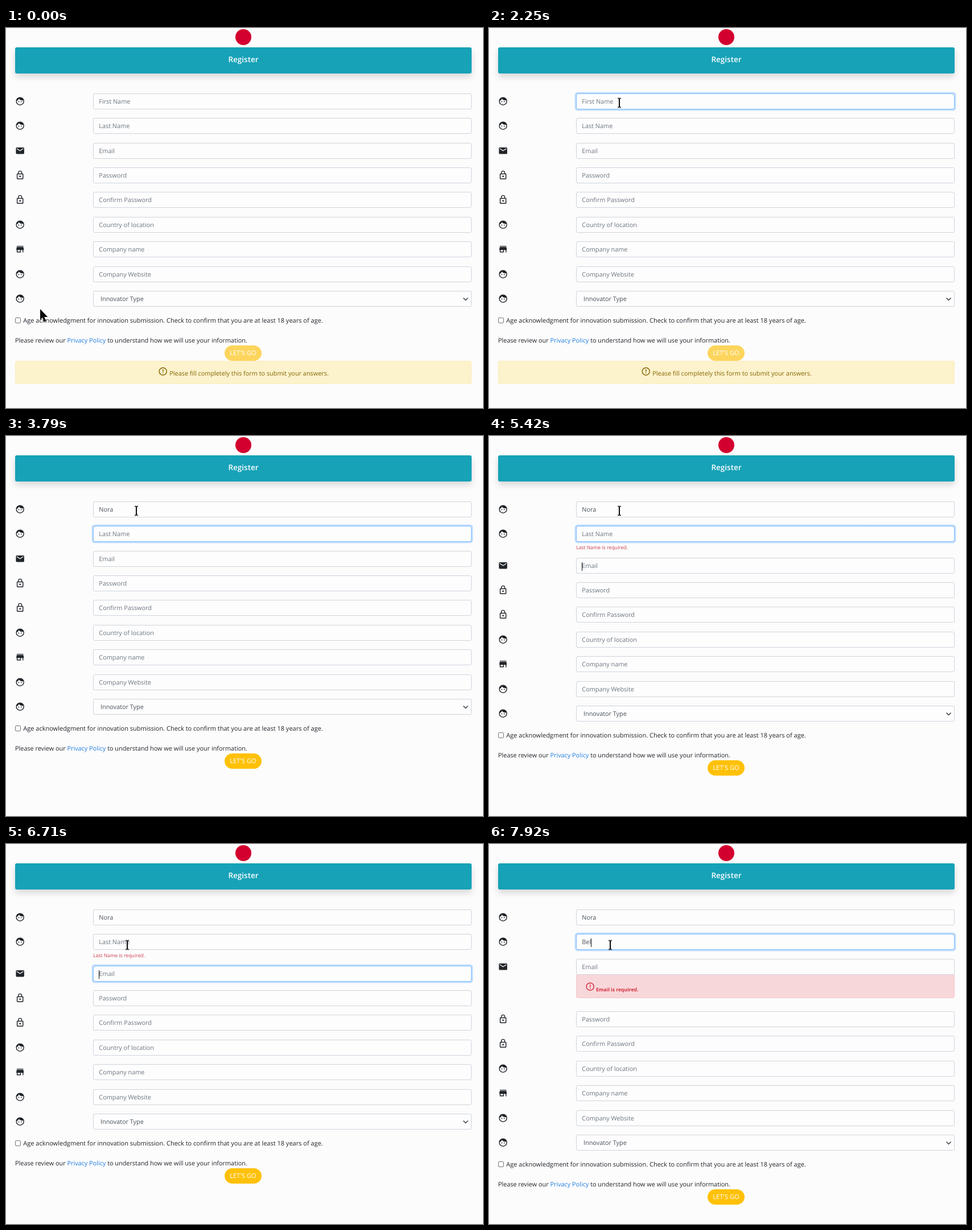
Recreate the animation shown at these times as an HTML page. Size 838 by 668 pixels, loop 8 s.

```html
<!DOCTYPE html>
<html lang="en">
<head>
<meta charset="utf-8">
<title>Register</title>
<style>
html, body { margin: 0; width: 100%; height: 100%; overflow: hidden; }
body {
  position: relative; background: #fcfcfd; color: #212529;
  font: 10.87px/26px "Open Sans", "Noto Sans", sans-serif;
  text-rendering: geometricPrecision; white-space: nowrap;
}
#stage { position: absolute; inset: 0 auto auto 0; width: 838px; height: 668px; overflow: hidden; }
#stage div, #stage p { position: absolute; margin: 0; box-sizing: border-box; }
#stage svg { position: absolute; left: 0; top: 0; fill: currentColor; overflow: visible; }
#stage .icon { width: 17.4px; height: 17.4px; }

#logo { left: 403px; top: 2px; width: 28px; height: 28px; border-radius: 50%; background: #d3002f; }
#title {
  left: 16px; top: 34px; width: 802px; height: 46px; border-radius: 3px;
  background: #17a2b8; box-shadow: 0 6px 12px rgba(0, 0, 0, .15);
  color: #fff; font-size: 13.5px; font-weight: 600; line-height: 42px; text-align: center;
}

/* form rows */
.row { left: 16px; width: 802px; height: 28px; }
#stage .row > .icon { top: 5px; }
.field {
  left: 137px; top: 0; width: 665px; height: 28px; padding-left: 9.3px;
  border: 1px solid #ced4da; border-radius: 3px; background: #fdfdfe;
  color: #495057; line-height: 28px;
}
.field::after {
  content: ""; position: absolute; inset: -1px; opacity: 0; border-radius: 3px;
  border: 1px solid #80bdff; box-shadow: 0 0 0 2.3px rgba(0, 123, 255, .25);
}
.hint { color: #6c757d; }
.field .hint:not(:only-child) { position: absolute; left: 9.3px; }
.select { padding-left: 12px; }
.caret {
  display: inline-block; width: 1px; height: 15px; margin-right: -1px;
  vertical-align: middle; background: #111; opacity: 0;
}
#stage .chevron { left: 649px; top: 11px; width: 9px; height: 5px; }
.typed span { font-size: 0; }

/* messages and footer */
#required { left: 153px; top: 183px; color: #cc3a48; font-size: 8.7px; opacity: 0; }
#danger {
  left: 153px; top: 229px; width: 665px; height: 42px; opacity: 0;
  border: 1px solid #f5c6cb; border-radius: 3px; background: #f8d7da;
  color: #d32f3f; font-size: 8.65px; font-weight: 700;
}
#stage #danger .icon { left: 14.5px; top: 11.5px; }
#danger p { left: 34px; top: 12.5px; }
#check { left: 16px; top: 509px; width: 10px; height: 10px; border: 1px solid #767676; border-radius: 2px; background: #fff; }
#age { left: 30.3px; top: 502px; font-size: 11px; }
#policy { left: 16px; top: 537px; }
#policy span { color: #1f7de0; }
#go {
  left: 384px; top: 558px; width: 65px; height: 27px; border-radius: 14px;
  background: #ffc107; color: #fff; font-size: 11.2px; line-height: 27px; text-align: center; opacity: .65;
}
#warning {
  left: 16px; top: 585px; width: 802px; height: 41px;
  border: 1px solid #fcedc0; border-radius: 3px; background: #fcf2cb; color: #856404;
}
#stage #warning .icon { left: 250px; top: 8.5px; }
#warning p { left: 270.3px; top: 9px; }

/* timeline: 1% is 80 ms */
#lower { inset: 0; animation: lower 8s step-end infinite; }
#tail { inset: 0; animation: tail 8s step-end infinite; }
@keyframes lower { 0% { transform: none } 67.75% { transform: translateY(12px) } 89.625%, to { transform: none } }
@keyframes tail { 0% { transform: none } 85.375%, to { transform: translateY(49px) } }

#first::after { animation: focus-first 8s ease-in-out infinite; }
#last::after { animation: focus-last 8s ease-in-out infinite; }
#email::after { animation: focus-email 8s ease-in-out infinite; }
@keyframes focus-first { 0%, 21.375%, 43%, to { opacity: 0 } 23.25%, 41.125% { opacity: 1 } }
@keyframes focus-last { 0%, 41.125%, 69.7%, 85.375% { opacity: 0 } 43%, 67.75%, 87.25%, to { opacity: 1 } }
@keyframes focus-email { 0%, 67.75%, 87.25%, to { opacity: 0 } 69.7%, 85.375% { opacity: 1 } }

#first .caret { animation: caret-first 8s step-end infinite; }
#last .caret { animation: caret-last 8s step-end infinite; }
#email .caret { animation: caret-email 8s step-end infinite; }
@keyframes caret-first { 0%, 28.125%, 41.125%, to { opacity: 0 } 21.375%, 31.25% { opacity: 1 } }
@keyframes caret-last { 0%, 47.375%, 61%, to { opacity: 0 } 41.125%, 54.125%, 85.375% { opacity: 1 } }
@keyframes caret-email { 0%, 74.5%, 85.375%, to { opacity: 0 } 67.75%, 81.25% { opacity: 1 } }

#first .hint, #warning { animation: gone-first 8s step-end infinite; }
#last .hint { animation: gone-last 8s step-end infinite; }
#go { animation: enable 8s step-end infinite; }
#required { animation: required 8s step-end infinite; }
#danger { animation: danger 8s step-end infinite; }
@keyframes gone-first { 0% { opacity: 1 } 31.25%, to { opacity: 0 } }
@keyframes gone-last { 0% { opacity: 1 } 89.625%, to { opacity: 0 } }
@keyframes enable { 0% { opacity: .65 } 31.25%, to { opacity: 1 } }
@keyframes required { 0%, 89.625%, to { opacity: 0 } 67.75% { opacity: 1 } }
@keyframes danger { 0% { opacity: 0 } 85.375%, to { opacity: 1 } }

.typed span { animation: 8s step-end infinite; }
#first .typed :nth-child(1) { animation-name: key1; }
#first .typed :nth-child(2) { animation-name: key2; }
#first .typed :nth-child(3) { animation-name: key3; }
#first .typed :nth-child(4) { animation-name: key4; }
#last .typed :nth-child(1) { animation-name: key5; }
#last .typed :nth-child(2) { animation-name: key6; }
#last .typed :nth-child(3) { animation-name: key7; }
@keyframes key1 { 0% { font-size: 0 } 31.25%, to { font-size: 10.87px } }
@keyframes key2 { 0% { font-size: 0 } 34.875%, to { font-size: 10.87px } }
@keyframes key3 { 0% { font-size: 0 } 36.5%, to { font-size: 10.87px } }
@keyframes key4 { 0% { font-size: 0 } 38.5%, to { font-size: 10.87px } }
@keyframes key5 { 0% { font-size: 0 } 89.625%, to { font-size: 10.87px } }
@keyframes key6 { 0% { font-size: 0 } 93.75%, to { font-size: 10.87px } }
@keyframes key7 { 0% { font-size: 0 } 99%, to { font-size: 10.87px } }

#mouse { left: 0; top: 0; color: #0a0a0a; animation: mouse 8s ease-in-out infinite; }
#arrow { animation: arrow 8s step-end infinite; }
#beam { animation: beam 8s step-end infinite; }
@keyframes mouse {
  0%, 1.625% { transform: translate(60px, 494px) }
  11.5%, 14.125% { transform: translate(268px, 208px) }
  16.625%, 79.125% { transform: translate(229px, 131.5px) }
  83%, to { transform: translate(213px, 177.5px) }
}
@keyframes arrow { 0% { opacity: 1 } 6.25%, to { opacity: 0 } }
@keyframes beam { 0% { opacity: 0 } 6.25%, to { opacity: 1 } }
</style>
</head>
<body>
<svg width="0" height="0" style="position:absolute">
  <symbol id="face" viewBox="0 0 24 24"><path d="M9 11.75a1.25 1.25 0 1 0 0 2.5 1.25 1.25 0 1 0 0-2.5zm6 0a1.25 1.25 0 1 0 0 2.5 1.25 1.25 0 1 0 0-2.5zM12 2a10 10 0 1 0 0 20 10 10 0 1 0 0-20zm0 18c-4.41 0-8-3.59-8-8 0-.29.02-.58.05-.86 2.36-1.05 4.23-2.98 5.21-5.37C11.07 8.33 14.05 10 17.42 10c.78 0 1.53-.09 2.25-.26.21.71.33 1.47.33 2.26 0 4.41-3.59 8-8 8z"/></symbol>
  <symbol id="mail" viewBox="0 0 24 24"><path d="M20 4H4a2 2 0 0 0-2 2v12a2 2 0 0 0 2 2h16a2 2 0 0 0 2-2V6a2 2 0 0 0-2-2zm0 4l-8 5-8-5V6l8 5 8-5z"/></symbol>
  <symbol id="lock" viewBox="0 0 24 24"><path d="M12 17a2 2 0 1 0 0-4 2 2 0 1 0 0 4zm6-9h-1V6A5 5 0 0 0 7 6v2H6a2 2 0 0 0-2 2v10a2 2 0 0 0 2 2h12a2 2 0 0 0 2-2V10a2 2 0 0 0-2-2zM8.9 6a3.1 3.1 0 0 1 6.2 0v2H8.9zM18 20H6V10h12z"/></symbol>
  <symbol id="store" viewBox="0 0 24 24"><path d="M20 4H4v2h16zm1 10v-2l-1-5H4l-1 5v2h1v6h10v-6h4v6h2v-6zm-9 4H6v-4h6z"/></symbol>
  <symbol id="alert" viewBox="0 0 24 24"><path d="M11 15h2v2h-2zm0-8h2v6h-2zm1-5a10 10 0 1 0 0 20 10 10 0 1 0 0-20zm0 18a8 8 0 1 1 0-16 8 8 0 1 1 0 16z"/></symbol>
</svg>

<div id="stage">
  <div id="logo"></div>
  <div id="title">Register</div>

  <div class="row" style="top:115px"><svg class="icon"><use href="#face"/></svg>
    <div class="field" id="first"><span class="hint">First Name</span><span class="typed"><span>N</span><span>o</span><span>r</span><span>a</span></span><span class="caret"></span></div></div>
  <div class="row" style="top:158px"><svg class="icon"><use href="#face"/></svg>
    <div class="field" id="last"><span class="hint">Last Name</span><span class="typed"><span>B</span><span>e</span><span>l</span></span><span class="caret"></span></div></div>
  <p id="required">Last Name is required.</p>

  <div id="lower">
    <div id="danger"><svg class="icon"><use href="#alert"/></svg><p>Email is required.</p></div>
    <div class="row" style="top:202px"><svg class="icon"><use href="#mail"/></svg>
      <div class="field" id="email"><span class="hint">Email</span><span class="caret"></span></div></div>

    <div id="tail">
      <div class="row" style="top:245px"><svg class="icon"><use href="#lock"/></svg><div class="field"><span class="hint">Password</span></div></div>
      <div class="row" style="top:288px"><svg class="icon"><use href="#lock"/></svg><div class="field"><span class="hint">Confirm Password</span></div></div>
      <div class="row" style="top:332px"><svg class="icon"><use href="#face"/></svg><div class="field"><span class="hint">Country of location</span></div></div>
      <div class="row" style="top:375px"><svg class="icon"><use href="#store"/></svg><div class="field"><span class="hint">Company name</span></div></div>
      <div class="row" style="top:419px"><svg class="icon"><use href="#face"/></svg><div class="field"><span class="hint">Company Website</span></div></div>
      <div class="row" style="top:462px"><svg class="icon"><use href="#face"/></svg>
        <div class="field select">Innovator Type<svg class="chevron" viewBox="0 0 9 5"><path d="M.5.5l4 4 4-4" fill="none" stroke="#343a40" stroke-width="1.5"/></svg></div></div>

      <div id="check"></div>
      <p id="age">Age acknowledgment for innovation submission. Check to confirm that you are at least 18 years of age.</p>
      <p id="policy">Please review our <span>Privacy Policy</span> to understand how we will use your information.</p>
      <div id="go">LET'S GO</div>
      <div id="warning"><svg class="icon"><use href="#alert"/></svg><p>Please fill completely this form to submit your answers.</p></div>
    </div>
  </div>

  <div id="mouse">
    <svg id="arrow" width="14" height="23"><path d="M0 0v19l4.3-4 3.1 7.3 3-1.3-3.1-7h6z"/></svg>
    <svg id="beam" width="1" height="1"><path d="M-3-8.5h2.2l.8.6.8-.6H3v1.4H1v14.2h2v1.4H.8L0 7.9l-.8.6H-3V7.1h2V-7.1h-2z"/></svg>
  </div>
</div>
</body>
</html>
```
